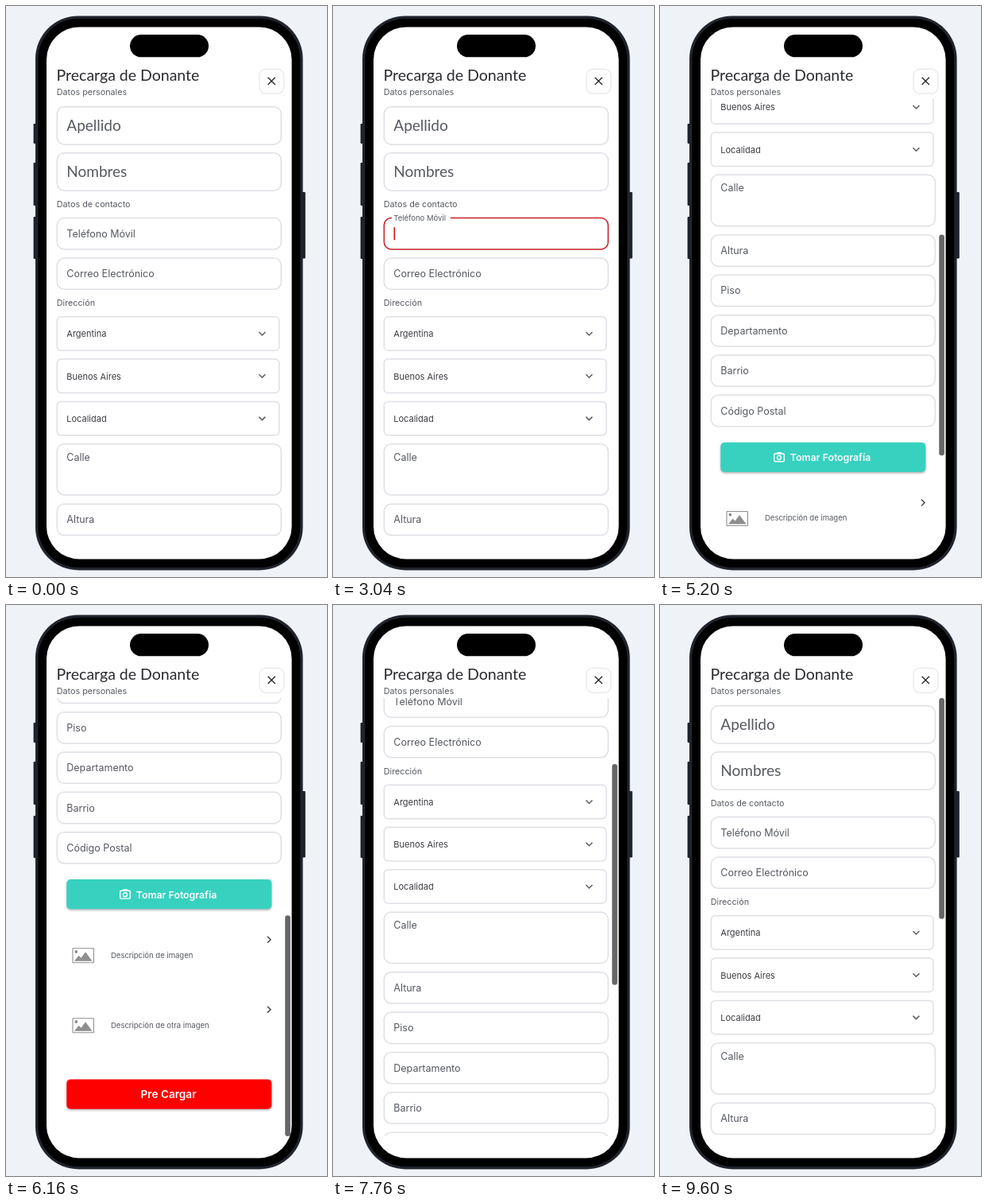
Write an HTML page with a canvas that moves like this. It is 404 by 718 pixels and loops after 9.92 s.

```html
<!DOCTYPE html>
<html lang="es">
<head>
<meta charset="utf-8">
<title>Precarga de Donante</title>
<style>
html, body { margin: 0; width: 100%; height: 100%; overflow: hidden; background: #eff3f8; }
canvas { display: block; width: 404px; height: 718px; }
</style>
</head>
<body>
<canvas id="stage"></canvas>
<script>
const W = 404, H = 718, LOOP = 9920, STEP = 80;
const VIEW_TOP = 117, VIEW_HEIGHT = 551, MAX_SCROLL = 542;
const HEADING = 'Lato, sans-serif', BODY = 'Inter, sans-serif';
const GRAY = [222, 224, 230], RED = [200, 32, 38], LABEL = '#555961';

const canvas = document.getElementById('stage');
const ctx = canvas.getContext('2d');
const ratio = window.devicePixelRatio || 1;
canvas.width = W * ratio;
canvas.height = H * ratio;

// Text fields: label, top, height, and the time span in which they hold focus.
const fields = [
  { label: 'Apellido', y: 126.7, h: 47.5, big: true, on: 1000, off: 1928 },
  { label: 'Nombres', y: 184.7, h: 47.5, big: true, on: 1928, off: 2840 },
  { label: 'Teléfono Móvil', y: 266.6, h: 39.3, on: 2840, off: 3480 },
  { label: 'Correo Electrónico', y: 317, h: 39.3, on: 3480, off: 4170 },
  { label: 'Calle', y: 550.7, h: 64.3, labelY: 567.3 },
  ...['Altura', 'Piso', 'Departamento', 'Barrio', 'Código Postal']
    .map((label, i) => ({ label, y: 626.3 + i * 50.35, h: 39.3 })),
];
const selects = ['Argentina', 'Buenos Aires', 'Localidad'];

const clamp = u => Math.min(1, Math.max(0, u));
const ease = u => 1 - (1 - clamp(u) ** 1.52) ** 2.78;
const ramp = (t, start, end) => ease((t - start) / (end - start));

function scrollAt(t) {
  return 280 * ramp(t, 4160, 4640) + (MAX_SCROLL - 280) * ramp(t, 5040, 5840)
    - MAX_SCROLL * ramp(t, 7040, 8480);
}

function box(x, y, w, h, r, fill, stroke, width = 1.5) {
  ctx.beginPath();
  ctx.roundRect(x, y, w, h, r);
  if (fill) { ctx.fillStyle = fill; ctx.fill(); }
  if (stroke) { ctx.strokeStyle = stroke; ctx.lineWidth = width; ctx.stroke(); }
}

// y is the middle of the capital letters.
function text(str, x, y, size, color, family = BODY, weight = 400) {
  ctx.font = `${weight} ${size}px ${family}`;
  ctx.fillStyle = color;
  ctx.fillText(str, x, y + size * 0.36);
}

function line(color, width, ...points) {
  ctx.beginPath();
  points.forEach(([x, y]) => ctx.lineTo(x, y));
  ctx.strokeStyle = color;
  ctx.lineWidth = width;
  ctx.stroke();
}

function drawField(f, t) {
  const p = f.on ? ramp(t, f.on, f.on + 167) - ramp(t, f.off, f.off + 167) : 0;
  const color = `rgb(${GRAY.map((g, i) => g + (RED[i] - g) * p)})`;
  const middle = f.labelY || f.y + f.h / 2;
  const size = f.big ? 19 : 12.5;
  const family = f.big ? HEADING : BODY;

  ctx.save();
  if (p > 0) {
    ctx.font = `${size}px ${family}`;
    const gap = (ctx.measureText(f.label).width * 0.76 + 8) * p;
    ctx.beginPath();
    ctx.rect(0, f.y - 3, W, f.h + 6);
    ctx.rect(74, f.y - 3, gap, 6);
    ctx.clip('evenodd');
  }
  box(64.3, f.y, 282, f.h, 9, null, color);
  ctx.restore();

  text(f.label, 76.3, middle + (f.y - middle) * p, size * (1 - 0.24 * p), LABEL, family);
  if (t >= f.on && t < f.off && (t - f.on) % 1000 < 500) {
    const half = f.big ? 12 : 8;
    ctx.fillStyle = '#d0141a';
    ctx.fillRect(76.5, f.y + f.h / 2 - half, 1.6, half * 2);
  }
}

function drawSelect(label, i) {
  const y = 390.8 + i * 53.3;
  box(64.3, y, 279.6, 42.4, 5, null, `rgb(${GRAY})`);
  text(label, 76.3, y + 21.5, 11, '#3a3c42');
  line('#5a5d63', 1.5, [318.4, y + 19.2], [322.4, y + 23.2], [326.4, y + 19.2]);
}

function drawButton(y, color) {
  ctx.save();
  ctx.shadowColor = 'rgba(0,0,0,.32)';
  ctx.shadowBlur = 3 * ratio;
  ctx.shadowOffsetY = 1.5 * ratio;
  box(76.3, y, 258, 37.3, 5, color);
  ctx.restore();
}

function drawCamera(x, y) {
  box(x - 6.3, y - 4.2, 12.6, 9.8, 1.2, null, '#fff', 1.4);
  ctx.fillStyle = '#fff';
  ctx.fillRect(x - 3, y - 6.2, 6, 2);
  ctx.beginPath();
  ctx.arc(x, y + 0.7, 2.5, 0, 7);
  ctx.stroke();
}

function drawImageRow(label, y) {
  box(84, y - 9, 26.4, 18, 0.5, '#fff', '#8e8e8e', 1.1);
  ctx.fillStyle = '#8e8e8e';
  ctx.beginPath();
  [[86, 7], [91.5, 0], [94.5, 3], [100, -4.5], [108.5, 7]].forEach(([x, dy]) => ctx.lineTo(x, y + dy));
  ctx.fill();
  ctx.beginPath();
  ctx.arc(88.3, y - 4.8, 1.9, 0, 7);
  ctx.fill();
  text(label, 132, y - 0.6, 9.5, LABEL);
  line('#4a4a4a', 1.5, [329, y - 24], [333, y - 20], [329, y - 16]);
}

function drawPhone() {
  ctx.fillStyle = '#eff3f8';
  ctx.fillRect(0, 0, W, H);
  [[148, 25], [197, 54], [265, 53]].forEach(([y, h]) => box(34.6, y, 5, h, 1, '#1d2129'));
  box(371, 234, 5.8, 83.5, 1, '#1d2129');
  box(37, 12.4, 336.6, 697, 54, '#20242d');
  box(40.3, 15.7, 330, 690.4, 51, '#000');
  box(51, 26.4, 308.6, 669, 41, '#fff');
  box(156, 36, 99, 28.3, 14.15, '#000');
}

function drawHeader() {
  text('Precarga de Donante', 63.6, 86.7, 19.5, '#2a2b2f', HEADING);
  text('Datos personales', 63.8, 107.7, 10.75, LABEL);
  box(319, 79.3, 30.8, 30.8, 8, '#fff', '#e6e7ec', 1.2);
  line('#2a2a2d', 1.4, [329.6, 89.8], [338.9, 99.1]);
  line('#2a2a2d', 1.4, [338.9, 89.8], [329.6, 99.1]);
}

function drawForm(t) {
  const scroll = scrollAt(t);
  ctx.save();
  ctx.beginPath();
  ctx.rect(51, VIEW_TOP, 308.6, VIEW_HEIGHT);
  ctx.clip();

  ctx.save();
  ctx.translate(0, -scroll);
  text('Datos de contacto', 63.8, 249.3, 10.75, LABEL);
  text('Dirección', 63.8, 373.3, 10.75, LABEL);
  selects.forEach(drawSelect);
  fields.forEach(f => drawField(f, t));
  drawButton(887, '#38d1c0');
  drawCamera(150, 905.5);
  text('Tomar Fotografía', 163.8, 906.3, 12.3, '#fff', BODY, 600);
  drawImageRow('Descripción de imagen', 982.8);
  drawImageRow('Descripción de otra imagen', 1070.8);
  drawButton(1138.4, '#f00');
  text('Pre Cargar', 169.6, 1157.3, 13.6, '#fff', BODY, 600);
  ctx.restore();

  const alpha = t >= 4200 ? 0.6 : 0.11 * ramp(t, 3880, 4040);
  const share = VIEW_HEIGHT / (VIEW_HEIGHT + MAX_SCROLL);
  box(351.2, VIEW_TOP + scroll * share, 6.7, VIEW_HEIGHT * share, 3.3, `rgba(0,0,0,${alpha})`);
  ctx.restore();
}

function frame(now) {
  const t = Math.floor((now % LOOP) / STEP) * STEP;
  ctx.setTransform(ratio, 0, 0, ratio, 0, 0);
  drawPhone();
  drawForm(t);
  drawHeader();
  requestAnimationFrame(() => frame(performance.now() - start));
}

const start = performance.now();
frame(0);
</script>
</body>
</html>
```
